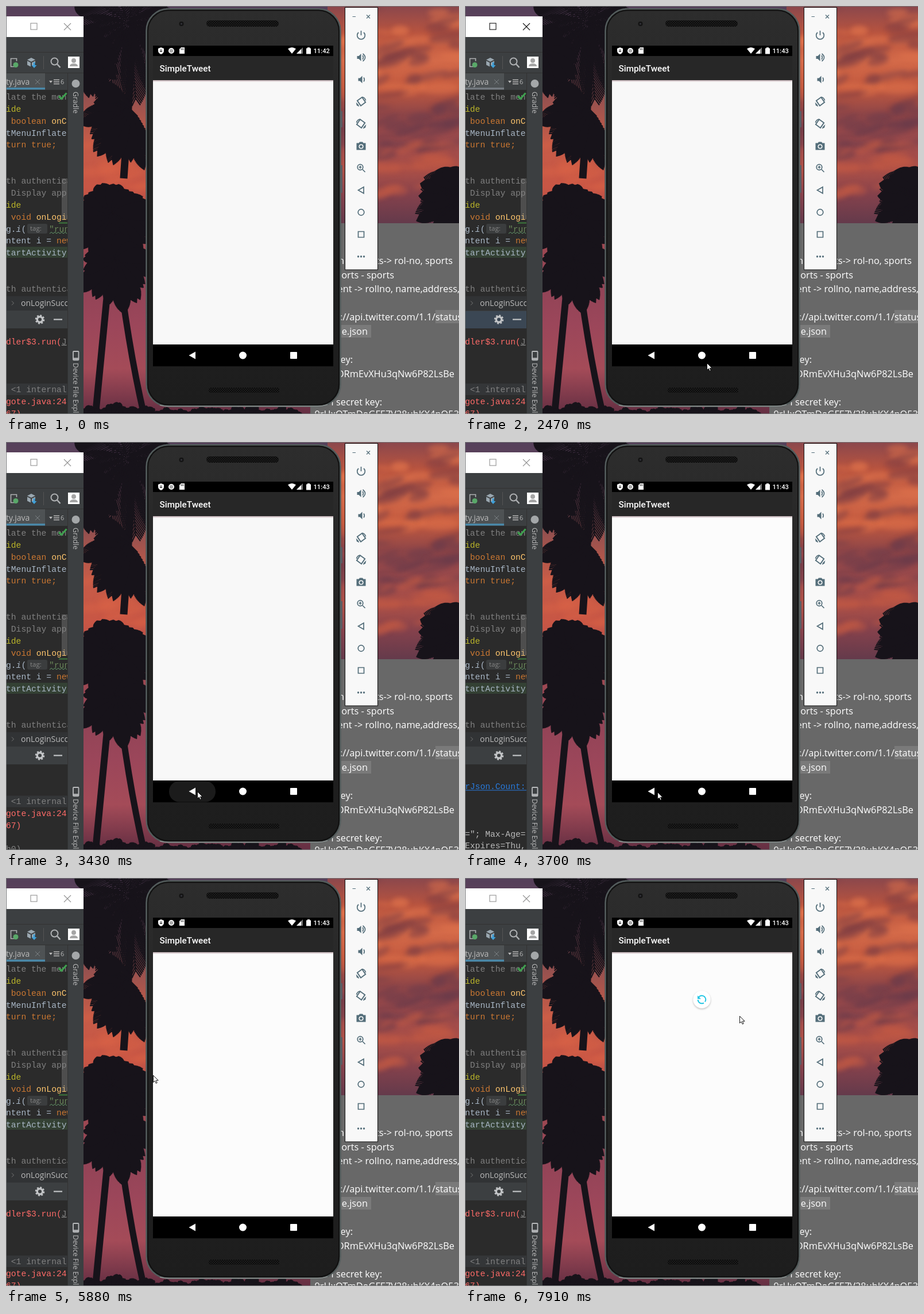
Write an HTML page with a canvas that moves like this. It is 789 by 710 pixels and loops after 8000 ms.

```html
<!DOCTYPE html>
<html lang="en">
<head>
<meta charset="utf-8">
<title>Emulator on a desktop</title>
<style>
html, body { margin: 0; width: 100%; height: 100%; overflow: hidden; background: #2b2b2b; }
canvas, #ui { position: absolute; left: 0; top: 0; width: 789px; height: 710px; display: block; }
text { white-space: pre; }
.mono { font: 14.67px "Liberation Mono", "Courier New", monospace; fill: #a9b7c6; }
.sans { font: 14px "Open Sans", "Noto Sans", sans-serif; fill: #bbb; }
.note { font: 16.35px "Open Sans", "Noto Sans", sans-serif; fill: #fff; }
.droid { font: 500 15.3px Roboto, sans-serif; fill: #fff; }
.k { fill: #cc7832; } .c { fill: #808080; } .m { fill: #ffc66d; } .a { fill: #bbb529; }
.s { fill: #6a8759; } .r { fill: #ff6b68; } .l { fill: #bbb; }
.line { fill: none; stroke: #546e7a; stroke-width: 1.7; }
.solid { fill: #546e7a; }
</style>
</head>
<body>
<canvas id="photo" width="789" height="710"></canvas>
<svg id="ui" viewBox="0 0 789 710">
  <defs>
    <pattern id="grille" width="4" height="4" patternUnits="userSpaceOnUse">
      <rect width="4" height="4" fill="#1d1d1d"/><circle cx="1" cy="1" r="1" fill="#050505"/><circle cx="3" cy="3" r="1" fill="#050505"/>
    </pattern>
    <linearGradient id="body" x2="0" y2="1">
      <stop stop-color="#2d2d2d"/><stop offset=".5" stop-color="#222"/><stop offset="1" stop-color="#1d1d1d"/>
    </linearGradient>
    <linearGradient id="barShade" x2="0" y2="1">
      <stop stop-color="#b9a8ac"/><stop offset="1" stop-color="#f4eef0"/>
    </linearGradient>
    <filter id="soft" x="-30%" y="-30%" width="160%" height="160%"><feGaussianBlur stdDeviation="1.4"/></filter>
  </defs>

  <!-- notes -->
  <rect x="530" y="378" width="259" height="332" fill="#686868"/>
  <rect x="748" y="529" width="41" height="23" fill="#7a7a7a"/>
  <rect x="570" y="555" width="66" height="22" fill="#7a7a7a"/>
  <g class="note" id="notes"></g>

  <!-- IDE -->
  <g id="ide">
    <rect x="1" y="18" width="134" height="692" fill="#3c3f41"/>
    <rect x="1" y="18" width="134" height="36" fill="#fff"/>
    <g id="caption" fill="none" stroke-width="1.1"><rect x="43" y="30" width="11" height="11"/><path d="M101 30l12 12m0-12l-12 12"/></g>
    <path d="M1 80.5H135M1 116.5H135" stroke="#323232"/>
    <g fill="none" stroke="#afb1b3" stroke-width="1.6">
      <path d="M15 105.500H8.500V91.500H18.500V96"/>
      <circle cx="84.500" cy="96.500" r="6" stroke-width="2"/><path d="M89 101l5.500 6" stroke-width="2.500"/>
    </g>
    <circle cx="17" cy="102.500" r="4.500" fill="#59a869"/>
    <path d="M37 93.500l7-3.500 7 3.500-7 3.500zM37 95.500l6 3v7l-6-3zM45 98.500l6-3v3l-3 5h-3z" fill="#9aa7b0"/>
    <path d="M47.500 98h3v5h3l-4.500 5-4.500-5h3z" fill="#40a0d8"/>
    <path d="M65.500 87v23" stroke="#555"/>
    <rect x="108" y="88" width="20" height="20" fill="#fff"/>
    <path d="M111 105q0-5 7-5t7 5z" fill="#a5a5a5"/><circle cx="118" cy="95" r="4" fill="#a5a5a5"/>

    <rect x="1" y="117" width="67" height="28" fill="#4e5254"/>
    <rect id="tabLine" x="1" y="142" width="67" height="3.500"/>
    <text class="sans" x="0" y="137">ty.java</text>
    <path d="M51 128l8 8m0-8l-8 8" stroke="#7c8184"/>
    <path d="M75 130h6l-3 4z" fill="#bbb"/><path d="M83 128.500h10m-10 3.500h10m-10 3.500h10" stroke="#bbb" stroke-width="1.400"/>
    <text class="sans" x="95" y="136" style="font-size:11px">6</text>

    <rect x="1" y="146" width="106" height="359" fill="#2b2b2b"/>
    <rect x="1" y="419" width="106" height="19" fill="#344134"/>
    <rect x="37" y="379" width="35" height="17" rx="3" fill="#3b3d3e"/>
    <svg width="107" height="505"><g class="mono" id="code"></g>
      <path d="M76 396l3-2.500 3 2.500 3-2.500 3 2.500 3-2.500 3 2.500 3-2.500 3 2.500 3-2.500 3 2.500" fill="none" stroke="#659c6b"/></svg>
    <text class="sans" x="42" y="391" style="font-size:11.500px;fill:#868686">tag:</text>
    <rect x="97" y="300" width="10" height="71" fill="#8a8a8a" opacity=".36"/>
    <path d="M92 377.500h15" stroke="#3d7a3d" stroke-width="2"/>
    <path id="tick" d="M92 157l4.500 4.500 9-10" fill="none" stroke="#3fa04f" stroke-width="3.200"/>
    <g id="eye"><rect x="91" y="149" width="16" height="15" fill="#2b2b2b"/>
      <path d="M92 156.500q7-10 14 0q-7 10-14 0z" fill="#c4c6c8"/><circle cx="99" cy="156.500" r="3.200" fill="#2b2b2b"/><circle cx="99" cy="156.500" r="1.500" fill="#c4c6c8"/></g>

    <rect x="1" y="505" width="106" height="25" fill="#313335"/>
    <path d="M10 513.500l3.500 3.500-3.500 3.500" stroke="#777" fill="none"/>
    <svg width="107" height="560"><text class="sans" x="26" y="522">onLoginSuccess</text></svg>
    <rect id="head" x="1" y="531" width="106" height="30"/>
    <circle cx="59" cy="545.500" r="4.700" fill="none" stroke="#c2c4c6" stroke-width="3.400"/>
    <circle cx="59" cy="545.500" r="7" fill="none" stroke="#c2c4c6" stroke-width="2.600" stroke-dasharray="3 2.500"/>
    <path d="M83 545.500h15" stroke="#c2c4c6" stroke-width="2.200"/>
    <rect x="1" y="561" width="106" height="149" fill="#2b2b2b"/>
    <svg x="1" y="561" width="106" height="149" viewBox="1 561 106 149">
      <g class="mono" id="trace"></g><g class="mono" id="cookies"></g>
    </svg>
    <path d="M107.500 117V710" stroke="#323232"/>
    <circle cx="121.500" cy="135" r="7" fill="#a4a7a9"/>
    <text class="sans" transform="translate(116.500 149)rotate(90)" style="font-size:12.300px">Gradle</text>
    <rect x="117" y="601" width="9.500" height="15" rx="1" fill="none" stroke="#b8babc" stroke-width="1.800"/><path d="M117 613.500h9.500" stroke="#b8babc" stroke-width="2.500"/>
    <text class="sans" transform="translate(116.500 621)rotate(90)" style="font-size:12.300px">Device File Explorer</text>
  </g>

  <!-- phone -->
  <path d="M584.500 183v28M584.500 277v48" stroke="#59616a" stroke-width="2.500"/>
  <rect x="244.500" y="5" width="338" height="691.500" rx="38" fill="url(#body)" stroke="#535c5c" stroke-width="2.500"/>
  <rect x="247" y="7.500" width="333" height="686.500" rx="36" fill="none" stroke="#111" stroke-width="2"/>
  <path d="M268 694.500Q275 696.500 285 696.500H542Q552 696.500 560 693.500" fill="none" stroke="#8d9291" stroke-width="1.500"/>
  <rect x="349" y="25" width="126" height="11" rx="5.500" fill="url(#grille)"/>
  <rect x="353" y="664" width="123" height="9" rx="3" fill="url(#grille)"/>
  <circle cx="305.500" cy="31" r="4" fill="#141414"/><circle cx="305.500" cy="31" r="1.500" fill="#34343c"/>
  <rect x="256" y="69" width="314" height="558" fill="#000"/>
  <rect x="256" y="87" width="314" height="42" fill="#272727"/>
  <rect id="page" x="256" y="129" width="314" height="460"/>
  <rect x="256" y="129" width="314" height="3" fill="url(#barShade)"/>
  <g fill="#fff">
    <path d="M270 72l5 2v4q0 4-5 6-5-2-5-6v-4z"/><path d="M270 75v5m-2-2l2 2 2-2" stroke="#000" fill="none"/>
    <circle cx="288" cy="78" r="4.200" fill="#aaa" stroke="#fff" stroke-width="1.700"/>
    <path d="M302 75l3-3h6v11h-9z"/><path d="M305 73.500v3m2-3v3m2-3v3" stroke="#000" stroke-width=".8"/>
    <path d="M491 74.500q7-5 14 0l-7 8.500z"/><path d="M517 72v11h-11z" fill="#777"/><path d="M514 75v8h-8z"/>
    <path d="M523 73.500h2v-1.500h4v1.500h2v10h-8z"/>
  </g>
  <text class="droid" id="clock" x="535.500" y="82" style="font-size:11.200px"></text>
  <text class="droid" x="267.500" y="114">SimpleTweet</text>
  <rect id="ripple" y="590" height="36.500" rx="18" fill="#1b1b1b"/>
  <path d="M330 601.500v13l-11.500-6.500z" fill="#fff"/><circle cx="412.500" cy="608" r="6.500" fill="#fff"/><rect x="495" y="602" width="12" height="12" rx="1" fill="#fff"/>
  <g id="spinner" transform="translate(412.500 211.500)">
    <circle cy="1.500" r="15.500" fill="#aaa" filter="url(#soft)" opacity=".65"/><circle r="15.200" fill="#fff"/>
    <path d="M-5.500 -4A6.800 6.800 0 0 1 5.500 4M-6.800 .5A6.800 6.800 0 0 0 3.500 5.800" fill="none" stroke="#20c5e4" stroke-width="2"/>
    <path d="M-7.500 -7v6h6z" fill="#20c5e4"/>
  </g>

  <!-- emulator controls -->
  <rect x="590.500" y="2.500" width="57" height="456.500" fill="#f8f8f8" stroke="#111"/>
  <path d="M603.500 18.500h5.500M628 15.500l6 6m0-6l-6 6" stroke="#546e7a" stroke-width="1.200"/>
  <g id="tools"></g>

  <path d="M0 .5H789M.5 0V710M0 709.500H789" stroke="#77797a" fill="none"/>
  <path id="cursor" d="M.5 .5V12.500L3.300 10 5.200 14.300 7.200 13.400 5.300 9.200H9.200z" fill="#fff" stroke="#000" stroke-width=".9"/>
</svg>
<script>
const $ = id => document.getElementById(id);
const row = (y, html, x = 0) => `<text x="${x}" y="${y + 4.5}">${html}</text>`;
const t = (cls, s) => `<tspan class="${cls}">${s}</tspan>`;

// ---- text blocks
$('code').innerHTML = [
  [158, t('c', 'late the menu')], [179, t('a', 'ide')],
  [200, t('k', ' boolean') + t('m', ' onCreate')], [221, 'tMenuInflater'], [241, t('k', 'turn true;')],
  [304, t('c', 'th authentica')], [325, t('c', ' Display app')], [346, t('a', 'ide')],
  [367, t('k', ' void') + t('m', ' onLogin')], [388, 'g.<tspan font-style="italic">i</tspan>('],
  [388, t('s', '"run'), 75], [408, 'ntent i = ' + t('k', 'new')], [429, 'tartActivity'], [492, t('c', 'th authentica')]
].map(r => row(...r)).join('');

$('trace').innerHTML = row(584, t('r', 'dler$3.run(') + '<tspan class="c" text-decoration="underline">J</tspan>') +
  '<rect x="1" y="657" width="106" height="20" fill="#343638"/>' + row(667, t('c', ' &lt;1 internal')) +
  row(688, t('r', 'gote.java:24')) + row(709, t('r', '67)')) + row(750, t('c', 'h0)'));
$('cookies').innerHTML = row(558, '<tspan fill="#287bde">rJson.Count:</tspan>') +
  '<path d="M1 564.5h106" stroke="#287bde"/>' +
  row(641, t('l', '="; Max-Age=')) + row(661, t('l', 'Expires=Thu,'));

$('notes').innerHTML = [
  [778, 443, 'enrolments-&gt; rol-no, sports'], [676, 468, 'sports - sports'],
  [790, 492, 'student -&gt; rollno, name,address,'], [748, 541, 'https://api.twitter.com/1.1/'],
  [630, 566, 'timeline.json'], [604, 615, 'API key:'], [781, 640, 'k7DRmEvXHu3qNw6P82LsBe'],
  [655, 689, 'API secret key:'], [789, 710, '9rHxQTmDoGFE7V28uhKX4nO53']
].map(([x, y, s]) => `<text text-anchor="end" x="${x}" y="${y + 5.5}">${s}</text>`).join('') +
  '<text x="748" y="546.5">statuses</text>';

// ---- side buttons, each drawn around its own centre
const L = d => `<path class="line" d="${d}"/>`, S = d => `<path class="solid" d="${d}"/>`;
const speaker = S('M-7 -2.500h3l4-4v13l-4-4h-3z');
const turned = L('M-6 -1.500L1.500 -7 7 1 -.5 6.500z') + S('M-8 1l1 5 4 2-1-3z');
[
  L('M-4.500 -5A6.800 6.800 0 1 0 4.500 -5M0 -8V0'),
  speaker + L('M2.500 -3.500Q5 0 2.500 3.500M3 -6.500Q11 0 3 6.500'),
  `<g transform="translate(2)">${speaker}</g>` + L('M4.500 -3.500Q7 0 4.500 3.500'),
  `<g transform="scale(1.1)">${turned}</g>` + L('M2 -8Q7 -7 8 -2'),
  `<g transform="scale(-1.1 1.1)">${turned}</g>` + L('M-2 -8Q-7 -7 -8 -2'),
  S('M-8 -5h4l1.500-2h5l1.500 2h4v12h-16z') + '<circle cy="1" r="3.300" fill="#546e7a" stroke="#f8f8f8" stroke-width="1.600"/>',
  L('M2.500 2.500L7 7M-4 -1.500H1M-1.500 -4V1') + '<circle class="line" cx="-1.500" cy="-1.500" r="4.800"/>',
  L('M4.500 -5.500V5.500L-5 0z'), '<circle class="line" r="5.300"/>', L('M-5 -5H5V5H-5z'),
  [-5, 0, 5].map(x => `<circle class="solid" cx="${x}" r="1.700"/>`).join('')
].forEach((d, i) => $('tools').innerHTML += `<g transform="translate(618.500 ${51 + i * 38.5})">${d}</g>`);

// ---- dusk sky and palms
const g = $('photo').getContext('2d');
let seed = 11;
const rnd = (a, b) => a + (b - a) * ((seed = (seed * 16807) % 2147483647) / 2147483647);
const dark = '#17131a';

function sky(x, w, colors) {
  const grad = g.createLinearGradient(0, 0, 0, x ? 378 : 710);
  colors.forEach((c, i) => grad.addColorStop(i / (colors.length - 1), c));
  g.fillStyle = grad;
  g.fillRect(x, 0, w, 710);
}
function clouds(n, x0, x1, y0, y1, color) {
  g.fillStyle = color;
  for (let i = 0; i < n; i++) {
    g.beginPath();
    g.ellipse(rnd(x0, x1), rnd(y0, y1), rnd(12, 45), rnd(3, 10), rnd(-.45, .1), 0, 7);
    g.fill();
  }
}
function frond(x, y, angle, len, droop) {
  const at = s => [x + Math.cos(angle) * len * s, y + Math.sin(angle) * len * s + droop * s * s];
  g.beginPath();
  g.moveTo(x, y);
  for (let s = .06; s <= 1; s += .035) {
    const [px, py] = at(s), leaf = len * .34 * Math.sin(Math.PI * (.12 + .8 * s));
    g.lineTo(px, py);
    for (const side of [-.75, .75]) {
      const a = angle + side;
      g.moveTo(px, py);
      g.lineTo(px + Math.cos(a) * leaf, py + Math.sin(a) * leaf + leaf * .45);
    }
    g.moveTo(px, py);
  }
  g.stroke();
}
function palm(x, y, n, len, from = 0, to = 6.28) {
  g.strokeStyle = dark;
  g.lineWidth = 2.2;
  for (let i = 0; i < n; i++) frond(x, y, from + (to - from) * i / n, len * rnd(.85, 1.15), len * .35);
}
function trunk(x0, y0, cx, cy, x1, y1, w) {
  g.strokeStyle = dark;
  g.lineWidth = w;
  g.beginPath();
  g.moveTo(x0, y0);
  g.quadraticCurveTo(cx, cy, x1, y1);
  g.stroke();
}

sky(0, 560, ['#55405a', '#65435a', '#94504f', '#c65c48', '#c85645', '#a54a50', '#8f4355', '#9b465a', '#a44b58', '#632e42']);
sky(560, 229, ['#8a474c', '#b9543f', '#d46a49', '#c2593f', '#8d4548', '#9a4a4c', '#ad5047', '#83414c', '#643a4b']);
g.filter = 'blur(4px)';
clouds(24, 570, 800, 10, 150, 'rgba(226,116,76,.5)');
clouds(18, 640, 800, 0, 170, 'rgba(120,58,66,.5)');
clouds(26, 570, 800, 170, 260, 'rgba(105,58,74,.5)');
clouds(14, 640, 800, 240, 330, 'rgba(205,94,68,.45)');
clouds(12, 140, 245, 180, 330, 'rgba(220,100,72,.4)');
g.filter = 'none';

palm(812, 318, 9, 84, 2.3, 4.3);
trunk(222, 20, 214, 170, 205, 300, 13);
palm(214, 30, 13, 105);
palm(130, 75, 8, 65, -1.5, 2.2);
palm(215, 175, 8, 75, 1.2, 4.4);
trunk(184, 420, 170, 560, 156, 710, 12);
trunk(192, 420, 212, 590, 240, 710, 11);
g.fillStyle = dark;
g.beginPath();
g.ellipse(188, 375, 38, 58, 0, 0, 7);
g.ellipse(192, 455, 30, 45, 0, 0, 7);
g.fill();
palm(185, 360, 17, 68);
palm(190, 440, 14, 60);
for (let x = 140; x < 520; x += 24) palm(x, 718, 7, rnd(18, 36), 3.3, 6.1);

// ---- timeline: [start, value...], held until the next step
const at = (steps, now) => steps.filter(s => s[0] <= now).pop();
const moves = [
  [0], [2470, 421, 621], [2620, 395, 618], [2740, 352, 612], [2860, 333, 608],
  [3580, 335, 609], [3820, 338, 610], [3970, 342, 610], [4120, 358, 609], [4240, 365, 609],
  [4360, 371, 611], [4480, 112, 627], [4630, 16, 688], [4760],
  [5880, 256, 343], [6030, 290, 314], [6180, 293, 314], [6330, 543, 223],
  [6490, 541, 212], [6640, 489, 230], [6790, 478, 240]
];
const traceY = [[0, 0], [3430, -41.5], [3580], [4480, 0]];
const cookieY = [[0], [3580, 83], [3700, 41.5], [3820, 0], [4480]];
const ripples = [[0], [3280, 302, 44, .7], [3430, 284, 81, 1], [3580, 284, 81, .5], [3700]];

const show = (id, on) => $(id).style.display = on ? '' : 'none';
function place(id, [, x, y]) {
  show(id, x !== undefined);
  if (x !== undefined) $(id).setAttribute('transform', `translate(${x} ${y})`);
}
function render(now) {
  const within = (a, b) => now >= a && now < b;
  $('caption').setAttribute('stroke', within(250, 3160) ? '#111' : '#929292');
  $('head').setAttribute('fill', within(390, 3280) ? '#3b4754' : '#3c3f41');
  $('tabLine').setAttribute('fill', within(390, 3280) ? '#747a80' : '#4a88a8');
  show('eye', within(800, 1470));
  show('tick', !within(800, 1470));
  $('clock').textContent = now < 1070 ? '11:42' : '11:43';
  $('page').setAttribute('fill', now < 3580 ? '#f8f8f8' : '#fcfcfc');
  show('spinner', now >= 7910);
  place('cursor', at(moves, now));
  for (const [id, steps] of [['trace', traceY], ['cookies', cookieY]]) {
    const y = at(steps, now)[1];
    place(id, y === undefined ? [0] : [0, 0, y]);
  }
  const [, x, w, o] = at(ripples, now);
  show('ripple', w);
  if (w) {
    $('ripple').setAttribute('x', x);
    $('ripple').setAttribute('width', w);
    $('ripple').setAttribute('opacity', o);
  }
}
const start = performance.now();
function tick() {
  render((performance.now() - start) % 8000);
  requestAnimationFrame(tick);
}
tick();
</script>
</body>
</html>
```
